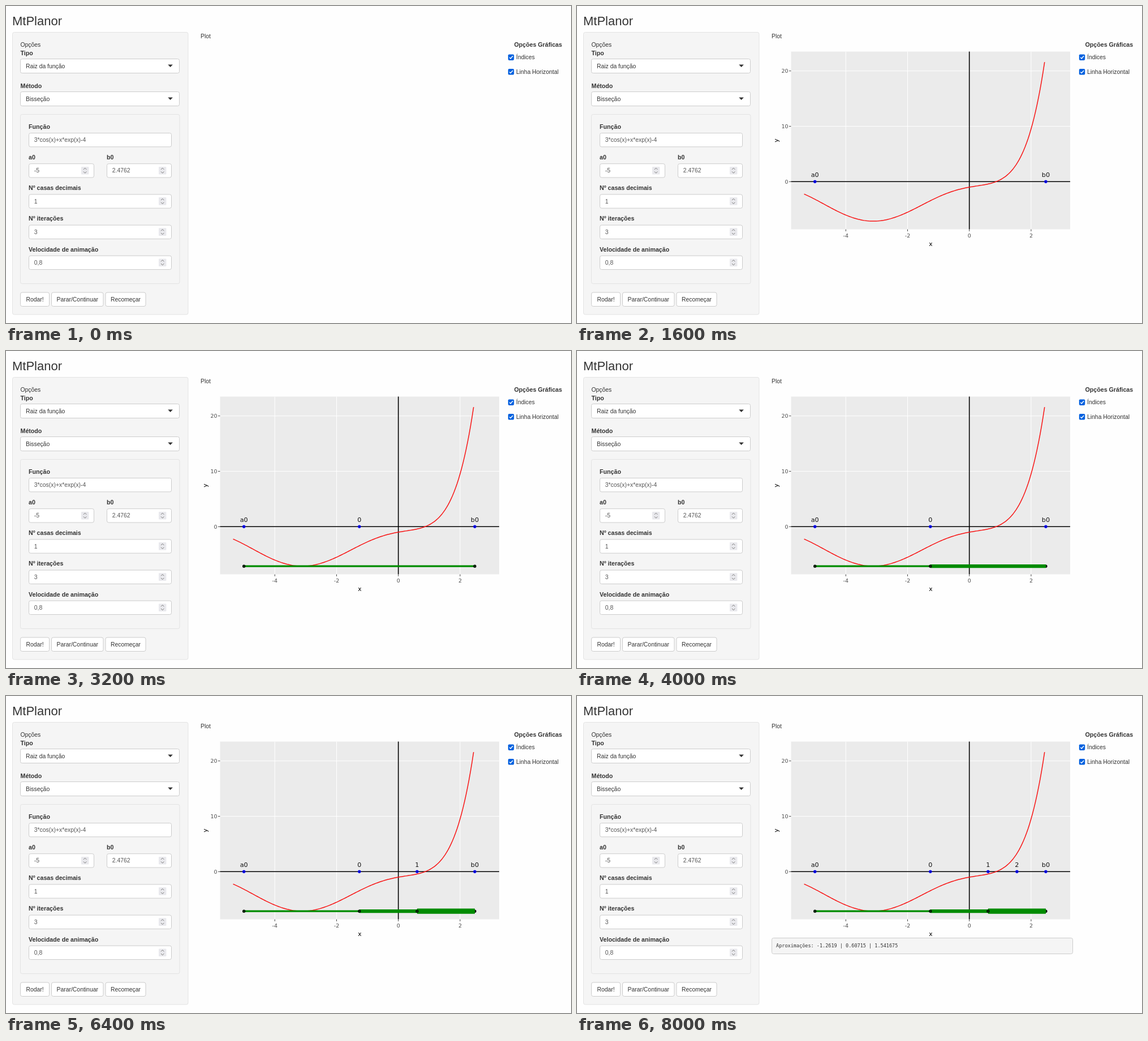
These frames come from a looping animation (999 px wide and 560 px high, 8.8 s). An HTML page:

```html
<!DOCTYPE html>
<html lang="pt">
<head>
<meta charset="utf-8">
<title>Bisseção</title>
<style>
html, body { margin: 0; width: 100%; height: 100%; overflow: hidden; background: #fefefe; }
svg { display: block; width: 999px; height: 560px; font: 10.4px "Liberation Sans", Arial, sans-serif; fill: #333; }
.bold { font-weight: bold; font-size: 10.67px; }
.value { fill: #555; }
.box { fill: #fff; stroke: #ccc; }
.well { fill: #f5f5f5; stroke: #e3e3e3; }
.tick { font: 9.5px "DejaVu Sans", Verdana, sans-serif; fill: #4d4d4d; }
.axis { font: 10.7px "DejaVu Sans", Verdana, sans-serif; fill: #000; text-anchor: middle; }
.mark { font: 11.2px "DejaVu Sans", Verdana, sans-serif; fill: #111; text-anchor: middle; }
.code { font: 8.52px "DejaVu Sans Mono", monospace; white-space: pre; }
.mid { text-anchor: middle; }
.end { text-anchor: end; }

/* each step stays visible until the loop restarts */
.step { animation: 8.8s step-end infinite; }
@keyframes at1 { 0% { opacity: 0 } 9.0909% { opacity: 1 } }
@keyframes at2 { 0% { opacity: 0 } 18.1818% { opacity: 1 } }
@keyframes at3 { 0% { opacity: 0 } 27.2727% { opacity: 1 } }
@keyframes at4 { 0% { opacity: 0 } 36.3636% { opacity: 1 } }
@keyframes at5 { 0% { opacity: 0 } 45.4545% { opacity: 1 } }
@keyframes at6 { 0% { opacity: 0 } 54.5454% { opacity: 1 } }
@keyframes at8 { 0% { opacity: 0 } 72.7272% { opacity: 1 } }
@keyframes at9 { 0% { opacity: 0 } 81.8181% { opacity: 1 } }
@keyframes at10 { 0% { opacity: 0 } 90.909% { opacity: 1 } }
</style>
</head>
<body>
<svg id="stage" viewBox="0 0 999 560"></svg>
<script>
const text = (x, y, str, cls = '') => `<text x="${x}" y="${y}" class="${cls}">${str}</text>`;
const rect = (x, y, x2, y2, cls, r = 3) =>
  `<rect x="${x}" y="${y}" width="${x2 - x}" height="${y2 - y}" rx="${r}" class="${cls}"/>`;
const line = (x1, y1, x2, y2, color, w = 1) =>
  `<path d="M${x1} ${y1}L${x2} ${y2}" stroke="${color}" stroke-width="${w}"/>`;
const step = (n, ...parts) => `<g class="step" style="animation-name:at${n}">${parts.join('')}</g>`;

// form controls
const select = (y, label, value) =>
  text(25.5, y - 19.3, label, 'bold') + rect(25.5, y - 12.5, 306.5, y + 12.5, 'box') +
  text(35, y + 3.7, value) + `<path d="M286.3 ${y - 2.6}h8.6l-4.3 4.6z"/>`;

const input = (x, x2, y, label, value) =>
  text(x - .5, y - 19.7, label, 'bold') + rect(x, y - 12, x2, y + 12.3, 'box') +
  text(x + 9.3, y + 3.7, value, 'value');

const spinner = (x, x2, y, label, value) => {
  const c = x2 - 15.8;
  return input(x, x2, y, label, value) +
    `<rect x="${c - 6.7}" y="${y - 6.8}" width="13.4" height="13.6" rx="1" fill="#e9e9ed"/>` +
    `<path d="M${c - 2.7} ${y - 1.8}l2.7 -2.7l2.7 2.7m-5.4 3.6l2.7 2.7l2.7 -2.7" fill="none" stroke="#777"/>`;
};

const button = (x, x2, label) =>
  rect(x, 506, x2, 530.5, 'box') + text((x + x2) / 2, 522, label, 'mid');

const check = (y, label) =>
  `<rect x="887.8" y="${y - 4.7}" width="10.4" height="10.4" rx="1.8" fill="#0060df"/>` +
  `<path d="M890.2 ${y + .6}l2 2.1l3.9 -4.6" fill="none" stroke="#fff" stroke-width="1.5"/>` +
  text(902, y + 3.8, label);

// chart
const px = x => 693.7 + x * 54.6;
const py = y => 310.3 - y * 9.78;
const f = x => 3 * Math.cos(x) + x * Math.exp(x) - 4;
const A = -5, B = 2.4762, M0 = -1.2619, M1 = .60715, M2 = 1.541675;
const base = py(-7.14);

function curve() {
  const pts = [], from = -5.35, to = 2.437, n = 160;
  for (let i = 0; i <= n; i++) {
    const x = from + (to - from) * i / n;
    pts.push(px(x).toFixed(2) + ',' + py(f(x)).toFixed(2));
  }
  return `<polyline points="${pts.join(' ')}" fill="none" stroke="#f81414" stroke-width="1.5" stroke-linejoin="round"/>`;
}

function chart() {
  let s = '<rect x="378.5" y="80.5" width="493.5" height="314" fill="#ebebeb"/>';
  for (const x of [-4, -2, 0, 2])
    s += line(px(x), 80.5, px(x), 394.5, '#fff') + line(px(x), 394.5, px(x), 398, '#444') +
      text(px(x), 408.6, x, 'tick mid');
  for (const y of [0, 10, 20])
    s += line(378.5, py(y), 872, py(y), '#fff') + line(375, py(y), 378.5, py(y), '#444') +
      text(373.6, py(y) + 3.5, y, 'tick end');
  return s + line(378.5, py(0), 872, py(0), '#000', 1.6) + line(px(0), 80.5, px(0), 394.5, '#000', 1.6) +
    curve() + text(625.3, 424, 'x', 'axis') +
    '<text class="axis" transform="translate(356 237.5) rotate(-90)">y</text>';
}

const point = (x, label) =>
  `<circle cx="${px(x)}" cy="${py(0)}" r="2.1" fill="#1010b0" stroke="#00f" stroke-width="1.2"/>` +
  text(px(x), 301.7, label, 'mark');
const dot = x => `<circle cx="${px(x)}" cy="${base}" r="2" fill="#064806" stroke="#000" stroke-width="1.3"/>`;
const bar = (x, w) => line(px(x), base, px(B), base, '#008b00', w);

document.getElementById('stage').innerHTML = [
  text(11, 34.3, 'MtPlanor', '" font-size="22'),
  rect(11.5, 46.5, 322, 545, 'well'),
  text(25.5, 72, 'Opções'),
  select(106, 'Tipo', 'Raiz da função'),
  select(164, 'Método', 'Bisseção'),
  rect(25.5, 191.5, 307, 490.5, 'well'),
  input(40.5, 292.5, 236.5, 'Função', '3*cos(x)+x*exp(x)-4'),
  spinner(40.5, 155.5, 290.7, 'a0', '-5'),
  spinner(178.5, 292.5, 290.7, 'b0', '2.4762'),
  spinner(40.5, 292.5, 344.9, 'Nº casas decimais', '1'),
  spinner(40.5, 292.5, 399.1, 'Nº iterações', '3'),
  spinner(40.5, 292.5, 453.2, 'Velocidade de animação', '0,8'),
  button(25.5, 76.5, 'Rodar!'),
  button(80.5, 172, 'Parar/Continuar'),
  button(176, 247, 'Recomeçar'),
  text(344, 57.3, 'Plot'),
  text(898.5, 72, 'Opções Gráficas', 'bold'),
  check(90.2, 'Índices'),
  check(115.8, 'Linha Horizontal'),
  step(1, chart()),
  step(2, point(A, 'a0'), point(B, 'b0')),
  step(3, bar(A, 3.1), dot(A), dot(B)),
  step(4, point(M0, '0')),
  step(5, bar(M0, 6.2), dot(M0)),
  step(6, point(M1, '1')),
  step(8, bar(M1, 9.4), dot(M1)),
  step(9, point(M2, '2')),
  step(10, rect(344.5, 427.5, 876.5, 455.5, 'well" style="stroke:#ccc'),
    text(352, 444.4, `Aproximações: ${[M0, M1, M2].join(' | ')}`, 'code'))
].join('');
</script>
</body>
</html>
```
